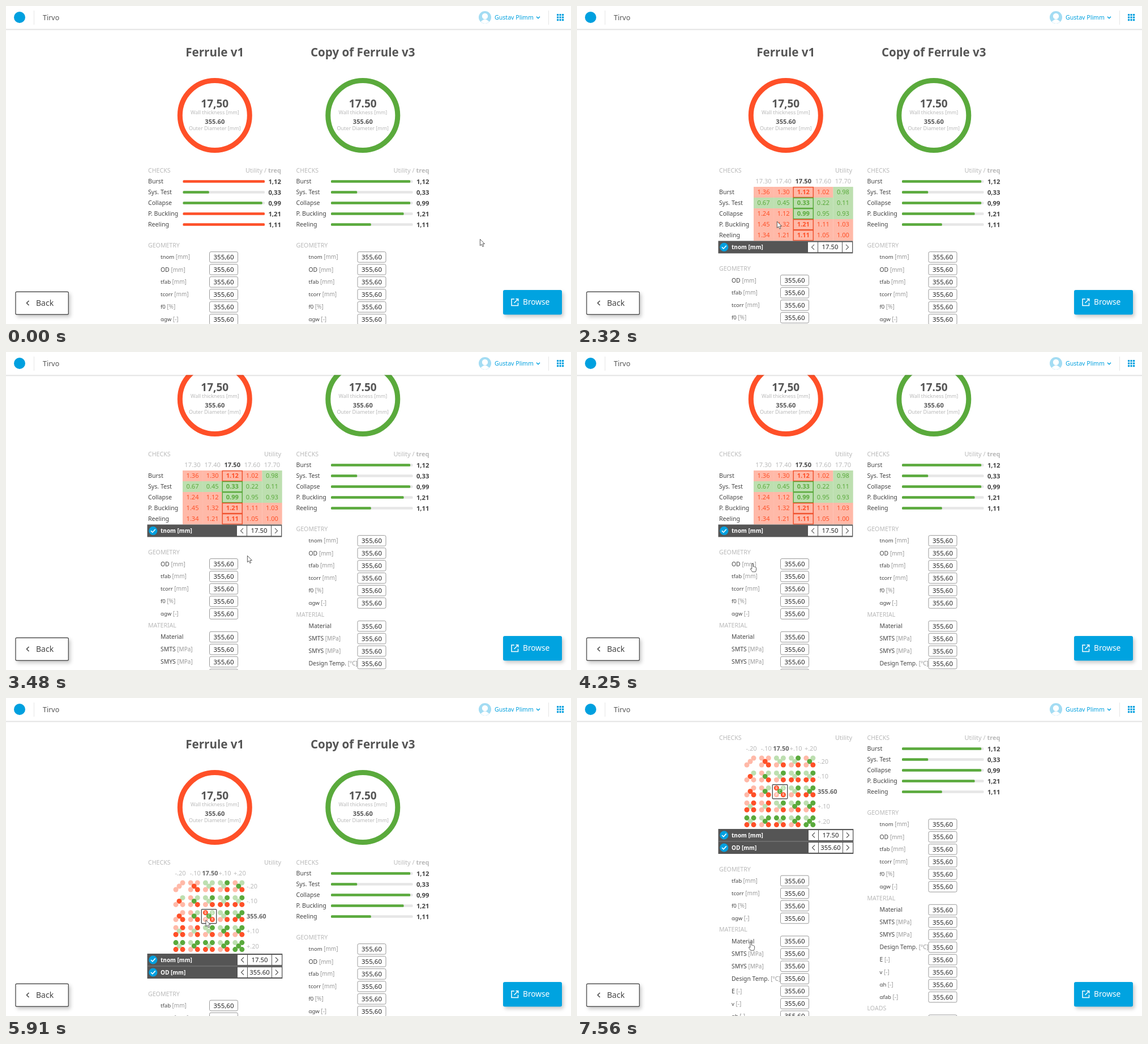
These frames come from a looping animation (998 px wide and 561 px high, 8 s). An HTML page:

```html
<!DOCTYPE html>
<html lang="en">
<head>
<meta charset="utf-8">
<title>Pipe comparison</title>
<style>
  html, body { margin: 0; width: 100%; height: 100%; overflow: hidden; background: #fff; }
  svg { display: block; width: 100%; height: 100%; font-family: "Noto Sans", sans-serif; }
  .bold { font-weight: 700; }
  .shadow { filter: drop-shadow(3px 4px 3px #0003); }
</style>
</head>
<body>
<svg id="stage" viewBox="0 0 998 561"></svg>
<script>
const RED = '#ff5028', GREEN = '#5aaa3c', PALE_RED = '#ffb9a8', PALE_GREEN = '#bddfb0';
const BLUE = '#00a0df', DARK = '#555', INK = '#444', GREY = '#b9b9b9';
const CHECKS = ['Burst', 'Sys. Test', 'Collapse', 'P. Buckling', 'Reeling'];
const LOOP = 8000;

// y is the middle of the capital letters
const text = (x, y, str, size, fill, anchor = 'start', bold = false) =>
  `<text x="${x}" y="${y + size * 0.36}" font-size="${size}" fill="${fill}" text-anchor="${anchor}"${bold ? ' class="bold"' : ''}>${str}</text>`;
const rect = (x, y, w, h, fill, extra = '') =>
  `<rect x="${x}" y="${y}" width="${w}" height="${h}" fill="${fill}" ${extra}/>`;
const circle = (x, y, r, fill, extra = '') =>
  `<circle cx="${x}" cy="${y}" r="${r}" fill="${fill}" ${extra}/>`;
const line = (d, stroke, width) =>
  `<path d="${d}" fill="none" stroke="${stroke}" stroke-width="${width}"/>`;
const each = (list, draw) => list.map(draw).join('');

function ring(x, title, wall, color) {
  return text(x, 82, title, 20.6, DARK, 'middle', true) +
    circle(x, 193, 61.5, 'none', `stroke="${color}" stroke-width="9"`) +
    text(x, 172.3, wall, 19, DARK, 'middle', true) +
    text(x, 187.5, 'Wall thickness [mm]', 9.1, GREY, 'middle') +
    text(x, 204, '355.60', 11.1, DARK, 'middle', true) +
    text(x, 216, 'Outer Diameter [mm]', 9, GREY, 'middle');
}

function checksHeading(x, unit) {
  return text(x, 290.5, 'CHECKS', 10.6, GREY) + text(x + 235, 290.5, unit, 11, GREY, 'end');
}

function bars(x, fills) {
  const values = ['1,12', '0,33', '0,99', '1,21', '1,11'];
  return checksHeading(x, 'Utility / <tspan class="bold">treq</tspan>') +
    each(CHECKS, (name, i) => {
      const y = 309.5 + i * 19, [share, color] = fills[i];
      return text(x, y, name, 10.6, INK) +
        rect(x + 61.5, y - 2.2, 144.5, 4.4, '#e6e6e6', 'rx="1.5"') +
        rect(x + 61.5, y - 2.2, 144.5 * share, 4.4, color, 'rx="1.5"') +
        text(x + 235, y, values[i], 11.3, INK, 'end', true);
    });
}

const SECTIONS = [
  ['GEOMETRY', ['tnom [mm]', 'OD [mm]', 'tfab [mm]', 'tcorr [mm]', 'f0 [%]', 'αgw [-]']],
  ['MATERIAL', ['Material', 'SMTS [MPa]', 'SMYS [MPa]', 'Design Temp. [°C]', 'E [-]', 'v [-]', 'αh [-]', 'αfab [-]']],
  ['LOADS', ['Load [kN]']]
];

function form(x, y, skipped = 0) {
  return each(SECTIONS, ([heading, rows], s) => {
    let out = text(x, y, heading, 10.6, GREY);
    y += 20.7;
    for (const row of rows.slice(s ? 0 : skipped)) {
      const split = row.indexOf('['), name = split < 0 ? row : row.slice(0, split);
      const unit = split < 0 ? '' : `<tspan fill="#999" font-size="10">${row.slice(split)}</tspan>`;
      const size = /^[a-zα]/.test(name) ? 9.6 : 10.4;
      out += text(x + 22, y, name + unit, size, INK) +
        rect(x + 108.5, y - 9.3, 50, 18.6, '#fff', 'rx="2.5" stroke="#999"') +
        text(x + 133.5, y, '355,60', 11.5, '#222', 'middle');
      y += 22;
    }
    y -= 2;
    return out;
  });
}

// Dark strip with a tick, a label and a stepper
function stepper(y, label, value, x) {
  return rect(249.5, y - 11, x + 79.3 - 249.5, 22, DARK) +
    circle(259.8, y, 7.6, BLUE) + line(`M256 ${y}l2.8 2.8l5-5.4`, '#fff', 1.6) +
    text(273, y, label, 10, '#fff', 'start', true) +
    rect(x, y - 8.9, 17, 17.8, '#fff') + rect(x + 18, y - 8.9, 42, 17.8, '#fff') +
    rect(x + 61, y - 8.9, 17, 17.8, '#fff') +
    line(`M${x + 11} ${y - 4.5}l-4.5 4.5l4.5 4.5M${x + 67} ${y - 4.5}l4.5 4.5l-4.5 4.5`, DARK, 1.1) +
    text(x + 39, y, value, 11.3, '#222', 'middle');
}

function utilityTable() {
  const table = [
    [1.36, 1.30, 1.12, 1.02, 0.98], [0.67, 0.45, 0.33, 0.22, 0.11], [1.24, 1.12, 0.99, 0.95, 0.93],
    [1.45, 1.32, 1.21, 1.11, 1.03], [1.34, 1.21, 1.11, 1.05, 1.00]
  ];
  const width = 35.1, left = c => 312 + c * width;
  const heads = each([17.3, 17.4, 17.5, 17.6, 17.7], (v, c) =>
    text(left(c) + width / 2, 309.5, v.toFixed(2), 11.1, c === 2 ? INK : GREY, 'middle', c === 2));
  const cells = each(table, (row, r) => text(251, 328.5 + r * 19, CHECKS[r], 10.6, INK) +
    each(row, (v, c) => {
      const bad = v >= 1, y = 319 + r * 19;
      return rect(left(c), y, width + 0.2, 19.1, bad ? PALE_RED : PALE_GREEN) +
        text(left(c) + width / 2, y + 9.5, v.toFixed(2), 11.1, bad ? RED : GREEN, 'middle', c === 2);
    }));
  const frames = each(table, (row, r) =>
    rect(left(2), 319.6 + r * 19, width, 18, 'none', `stroke="${row[2] >= 1 ? '#f0532f' : GREEN}" stroke-width="1.5"`));
  return checksHeading(251, 'Utility') + heads + cells + frames + stepper(425.4, 'tnom [mm]', '17.50', 408);
}

// Each group: top left, top right, centre, bottom left, bottom right; capitals are saturated
function dotMatrix() {
  const colors = { r: PALE_RED, R: RED, g: PALE_GREEN, G: GREEN };
  const groups = [
    '.rrr. rrRrR gggrR gGgrR rgGrR', '.gRrr rgGrR gGgrR gGgRR gGgRR', '.rRrR rgGrR RgGrR gGgrR gGGRR',
    'rRgRR rRgrR gGgrR gGGrR gGGrR', 'GGgRR gGGrR GGgRR gGGrR gGGGG'
  ];
  const offsets = [[-6, -6], [6, -6], [0, 0], [-6, 6], [6, 6]];
  const label = (v, i, x, y, anchor) => text(x, y, v, 11, i === 2 ? '#666' : GREY, anchor, i === 2);
  const heads = each(['-.20', '-.10', '17.50', '+.10', '+.20'], (v, i) =>
    label(v, i, 308 + i * 26.2, 309.5, 'middle'));
  const sides = each(['-.20', '-.10', '355.60', '+.10', '+.20'], (v, i) =>
    label(v, i, 425, 332 + i * 26.4, 'start'));
  const dots = each(groups, (row, r) => each(row.split(' '), (group, c) => {
    const x = 306 + c * 26.2, y = 332 + r * 26.4, selected = r === 2 && c === 2;
    return each([...group], (key, i) => {
      if (key === '.') return '';
      const dx = x + offsets[i][0], dy = y + offsets[i][1];
      return circle(dx, dy, 4.5, colors[key]) +
        (selected ? text(dx, dy, 'BSCPR'[i], 6.5, '#fff', 'middle') : '');
    });
  }));
  return checksHeading(251, 'Utility') + heads + sides + dots +
    rect(345.3, 372.8, 26.4, 25, 'none', 'rx="1" stroke="#555" stroke-width="1.4"') +
    stepper(462, 'tnom [mm]', '17.50', 409) + stepper(484, 'OD [mm]', '355.60', 409) +
    rect(249.5, 472.5, 238.8, 0.9, '#888');
}

function header() {
  return rect(0, 0, 998, 40.5, '#fff') + rect(0, 40.5, 998, 1.2, '#0002') + rect(0, 41.7, 998, 1, '#0001') +
    circle(24, 20, 10, BLUE) + rect(49, 8, 1, 25, '#e6e6e6') + text(65, 20.3, 'Tirvo', 12.5, DARK) +
    circle(846, 20, 11, '#a3dcf3') + circle(846, 18, 5.2, '#fff') +
    `<path d="M838.5 28Q846 19 853.5 28Q846 34 838.5 28Z" fill="#fff"/>` +
    text(863, 20.3, 'Gustav Plimm', 10.6, BLUE) + line('M937 18.7l3 3l3-3', BLUE, 1.4) +
    rect(958, 8, 1, 25, '#e6e6e6') +
    each([...Array(9).keys()], i => rect(973 + i % 3 * 4.5, 14 + Math.floor(i / 3) * 4.5, 3.2, 3.2, BLUE));
}

function buttons() {
  return rect(17, 504.3, 93.3, 40, '#fff', 'rx="2" stroke="#555" stroke-width="1.4" class="shadow"') +
    line('M40.5 520l-4 4l4 4', INK, 1.5) + text(53, 523.7, 'Back', 14, INK) +
    rect(878, 501, 104, 43.6, '#00a3e0', 'rx="3" class="shadow"') +
    line('M898 517h-5v11.5h11.5v-5M900.5 516.8h4.2v4.2M904.5 517l-7 7', '#fff', 1.5) +
    text(913, 522.3, 'Browse', 13.7, '#fff');
}

const leftFills = [[1, RED], [0.32, GREEN], [0.97, GREEN], [1, RED], [1, RED]];
const rightFills = [0.97, 0.32, 0.97, 0.89, 0.49].map(share => [share, GREEN]);
const outline = 'fill="#fff" stroke="#333" stroke-width=".8" stroke-linejoin="round"';

document.getElementById('stage').innerHTML = `
  <g id="page">
    ${ring(368.8, 'Ferrule v1', '17,50', RED)}
    ${ring(630.3, 'Copy of Ferrule v3', '17.50', GREEN)}
    ${bars(512.5, rightFills)}${form(512.5, 422.2)}
    <g id="panel0">${bars(251, leftFills)}${form(251, 422.2)}</g>
    <g id="panel1">${utilityTable()}${form(251, 463.2, 1)}</g>
    <g id="panel2">${dotMatrix()}${form(251, 521.8, 2)}</g>
  </g>
  ${header()}${buttons()}
  <g id="cursor">
    <path id="arrow" ${outline} d="M.4.4V11.8L3 9.4L4.9 13.6L6.8 12.7L5 8.6H8.5Z"/>
    <path id="hand" ${outline} d="M-1.2 1Q0-.6 1.2 1V5.5Q2.6 4.7 3.4 6Q4.8 5.5 5.4 6.8Q6.6 6.8 6.6 8.2V11Q6.2 13 5.4 14.8H-.4Q-1.6 12.4-3.8 9.8Q-3.4 8-1.2 9.6Z"/>
  </g>`;

// Start, end, number of steps, waypoints
const MOVES = [
  [90, 860, 9, [[837, 411], [740, 388], [480, 381], [330, 405], [292, 429]]],
  [940, 1030, 2, [[292, 429], [285, 441.5]]],
  [2030, 2790, 9, [[285, 441.5], [333, 402], [393, 335], [405, 344]]],
  [2900, 3170, 4, [[405, 344], [426, 359]]],
  [3680, 4250, 7, [[426, 359], [390, 380], [340, 386], [310, 373]]],
  [4640, 4930, 4, [[310, 373], [397, 408]]],
  [5530, 6190, 8, [[397, 408], [326, 381.5]]],
  [7080, 7560, 6, [[326, 381.5], [307, 430.5]]]
];
const HAND_TIMES = [[940, 1440], [4250, 4540], [6400, 6690], [7560, LOOP]];

function along(points, progress) {
  const at = progress * (points.length - 1), i = Math.min(Math.floor(at), points.length - 2);
  return points[i].map((v, axis) => v + (points[i + 1][axis] - v) * (at - i));
}

function cursorAt(t) {
  const move = MOVES.findLast(([start]) => t >= start);
  if (!move) return MOVES[0][3][0];
  const [start, end, steps, points] = move;
  const step = Math.min(steps, 1 + Math.floor((t - start) / (end - start) * (steps - 1) + 1e-6));
  return along(points, step / steps);
}

function scrollAt(t) {
  if (t >= 6690) return 220;
  return t >= 6400 || (t >= 3480 && t < 4540) ? 110 : 0;
}

const parts = {};
for (const el of document.querySelectorAll('[id]')) parts[el.id] = el;
const show = (id, visible) => { parts[id].style.display = visible ? '' : 'none'; };

function render(t) {
  const panel = t < 1440 ? 0 : t < 4540 ? 1 : 2;
  for (let i = 0; i < 3; i++) show('panel' + i, i === panel);
  parts.page.setAttribute('transform', `translate(0 ${-scrollAt(t)})`);
  parts.cursor.setAttribute('transform', `translate(${cursorAt(t)})`);
  const pointing = HAND_TIMES.some(([from, to]) => t >= from && t < to);
  show('hand', pointing);
  show('arrow', !pointing);
}

const begin = performance.now();
function tick() {
  render((performance.now() - begin) % LOOP);
  requestAnimationFrame(tick);
}
tick();
</script>
</body>
</html>
```
